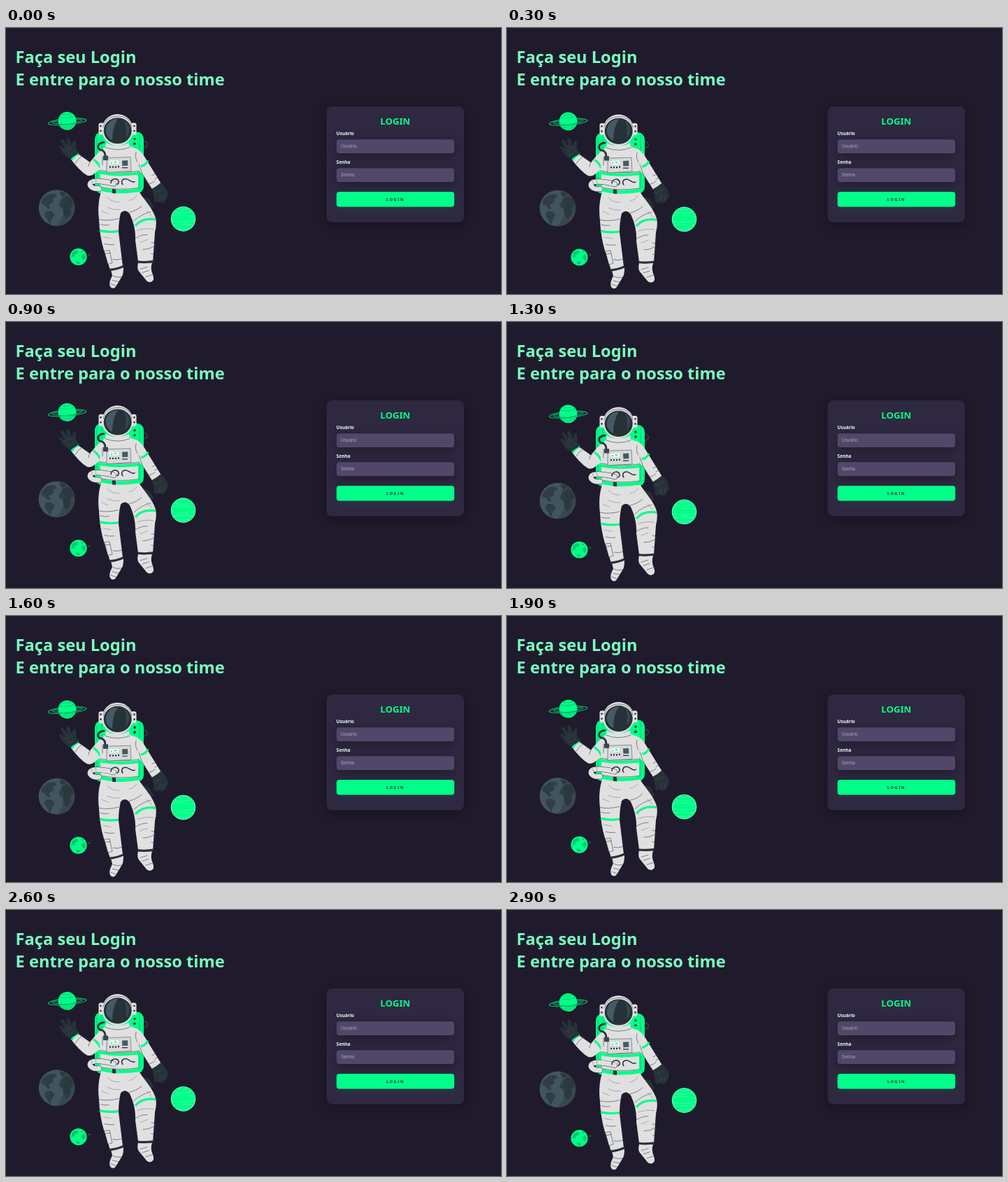
Write an HTML page that moves like this. It is 708 by 380 pixels and loops after 3000 ms.

```html
<!DOCTYPE html>
<html lang="pt">
<head>
<meta charset="utf-8">
<title>Login</title>
<style>
  html, body { margin: 0; width: 100%; height: 100%; overflow: hidden; background: #201b2c; }
  svg { display: block; width: 708px; height: 380px; }
  text { font: 700 23.63px "Noto Sans", sans-serif; }
  .title { fill: #77ffc0; }
  .label { font-size: 6.5px; fill: #f0ffff; }
  .hint { font: 6.7px "Liberation Sans", Arial, sans-serif; fill: #aaa3b8; }
  .shadow { filter: drop-shadow(0 4px 8px #00000056); }
  .suit { fill: #e0e0e0; }
  .green { fill: #00ff88; }
  .leaf { fill: #08b665; }
  .dark { fill: #263238; }
  .slate { fill: #455a64; }
  .line { fill: none; stroke: #263238; stroke-width: .55; stroke-linecap: round; stroke-linejoin: round; }
  .fold { fill: none; stroke: #8c9194; stroke-width: .7; stroke-linecap: round; }
  .band { fill: none; stroke: #00ff88; stroke-width: 3.2; }
  .strap { fill: none; stroke: #263238; stroke-width: 3.2; }
  .hose { fill: none; stroke: #263238; stroke-width: 2.5; stroke-linecap: round; }
  .stripe { fill: none; stroke: #08b665; stroke-width: .7; }
</style>
</head>
<body>
<svg viewBox="0 0 708 380">
  <g class="title">
    <text x="13.6" y="50.1">Faça seu Login</text>
    <text x="13.6" y="82.4">E entre para o nosso time</text>
  </g>

  <rect class="shadow" x="458.5" y="112" width="196.5" height="165.5" rx="8" fill="#2f2841"/>
  <text class="green" x="556.8" y="138.4" text-anchor="middle" style="font-size:13.2px">LOGIN</text>
  <text class="label" x="472.6" y="153.2">Usuário</text>
  <rect class="shadow" x="472.8" y="159.3" width="168.2" height="19.8" rx="4" fill="#514869"/>
  <text class="hint" x="478.7" y="171.3">Usuário</text>
  <text class="label" x="472.6" y="194.2">Senha</text>
  <rect class="shadow" x="472.8" y="200.2" width="168.2" height="19.8" rx="4" fill="#514869"/>
  <text class="hint" x="478.7" y="212.3">Senha</text>
  <rect class="green" x="472.7" y="234" width="168.5" height="21.4" rx="4" style="filter:drop-shadow(0 4px 8px #00ff8010)"/>
  <text x="544" y="246.8" fill="#2b124b" style="font-size:5.3px;letter-spacing:1.75px">LOGIN</text>

  <g id="space">
    <!-- ringed planet -->
    <g transform="translate(87.5 133.3) rotate(-5)">
      <circle class="green" r="13"/>
      <path class="stripe" d="M-11-6Q0-3 11-6M-8-10Q0-8 8-10M-12 7Q0 10 12 6M-9 10Q0 12 9 9"/>
      <path class="leaf" d="M-12.7 2Q0 7 12.8 2L12.6 3.6Q0 9-12.4 3.6Z"/>
      <path d="M-12.5-3C-37 0-30 5 0 5S37 0 12.5-3" fill="none" stroke="#08b665" stroke-width="1.2"/>
      <path d="M-12.8-1C-29 0-22 3 0 3S29 0 12.8-1" fill="none" stroke="#00ff88" stroke-width=".7"/>
    </g>

    <!-- grey planet -->
    <circle cx="72.5" cy="257.5" r="25.8" fill="#42555f"/>
    <path d="M76 232A25.8 25.8 0 0 1 72 283.300Q91 264 76 232Z" fill="#37474f"/>
    <g class="dark" opacity=".65">
      <path d="M52 245l8-7 9-1 4 4-6 3 1 5-7 4 3 5-4 1-5-6-5-2Z"/>
      <path d="M57 262l8 0 5 5-4 6-3 8-4-7-4-6Z"/>
      <path d="M79 245l8-5 7 3 3 10-5 4 1 8-6 8-5-7-1-7-6-5Z"/>
      <path d="M76 235l7 0 3 3-6 3Z"/>
    </g>

    <!-- striped planet -->
    <circle class="green" cx="253.500" cy="273.3" r="17.7"/>
    <circle cx="253.500" cy="273.3" r="17.2" fill="none" stroke="#6affb9"/>
    <path d="M240 263Q253 267 267 262M237 268Q250 266 270 270M237 276Q252 280 270 275M239 282Q253 279 268 282M244 287Q254 289 263 286M246 259Q254 261 261 258" fill="none" stroke="#45f5a5"/>

    <!-- small planet -->
    <circle class="green" cx="103.5" cy="327.5" r="12.1"/>
    <g class="leaf" opacity=".75">
      <path d="M95 321l5-3 4 2-2 3-4 1 1 4-4-1-2 2Z"/>
      <path d="M107 326l5-3 2 4-2 5-3-2Z"/>
      <path d="M99 334l4-1 3 3-3 2Z"/>
      <circle cx="109" cy="319.5" r="1.2"/>
      <circle cx="119" cy="324.3" r="1"/>
    </g>

    <!-- backpack -->
    <path class="hose" style="stroke:#37474f;stroke-width:1.3" d="M194 163C205 160 205 173 195 171"/>
    <path class="dark" d="M197 242l8 3 6 11-7 7-8-12Z"/>
    <rect class="green" x="127" y="149" width="70" height="88" rx="10"/>
    <path class="stripe" d="M130 157v66M137 152v20M191 153v76"/>
    <g class="dark"><circle cx="184" cy="159" r="1.800"/><circle cx="184" cy="166" r="1.800"/></g>

    <!-- raised arm -->
    <path class="suit" d="M140 173C132 177 126 185 120 192L103 180 93 188C100 198 109 207 116 211Q122 213 128 207L144 196Z"/>
    <path class="band" d="M125 188Q132 193 135 200M94 189Q97 182 104 180"/>
    <path class="line" d="M103 180l17 12 6-8M99 194Q102 188 108 184M120 192q-2 3-2 6"/>
    <path class="dark" d="M92 187C86 185 82 180 80 177L76 171Q76 168 79 169L84 173 78 161Q79 158 82 160L88 169 86 159Q88 156 91 159L94 169 96 162Q99 160 100 163L100 173Q104 176 103 180Z"/>
    <path class="line" style="stroke:#455a64" d="M84 173q2 3 5 3M88 169l2 4M94 169v4M88 181q6 0 10-6"/>

    <!-- lowered arm -->
    <path class="suit" d="M178 171C190 171 196 180 201 189L222 223 209 231 195 209 183 197Z"/>
    <path class="band" d="M193 198Q200 197 203 190"/>
    <path class="line" d="M190 195l5 14 14 22M209 211l6-3M213 216l4-2M205 223q5-1 8-4"/>
    <path class="dark" d="M209 230Q215 227 222 221L229 230Q233 236 231 242L226 249Q222 252 219 248L215 250Q211 249 212 244Z"/>
    <path class="line" style="stroke:#455a64" d="M219 248l2-8M225 247l1-7M212 235q7 0 12-5"/>

    <!-- legs -->
    <path class="suit" d="M137 232L189 232C194 242 209 256 214 272Q216 281 213 292L210 335 189 334 185 304Q186 285 177 266Q170 258 164 265Q161 277 161 292L167 341 149 346 140 318Q134 298 133 275Q130 250 137 232Z"/>
    <path class="suit" d="M150 346l18-4Q168 352 166 355L157 370Q154 374 150 371Q147 368 149 361L152 354Z"/>
    <path class="suit" d="M189 336l20 0Q206 344 210 353Q213 361 208 363Q203 365 199 359L190 348Q187 344 189 336Z"/>
    <path class="band" d="M134 290Q147 293 161 291M185 283Q195 271 214 274"/>
    <path class="strap" d="M148 346Q159 345 168 341M188 334.5Q199 336 211 334"/>
    <path class="line" d="M133 274Q144 277 161 273M135 281Q140 283 147 282M176 264Q186 262 194 255M183 276Q194 266 207 263M141 309Q148 311 155 310M185 301Q195 295 202 296M196 317Q204 317 211 313M153 331Q159 333 166 330"/>
    <path class="fold" d="M145 242Q151 250 162 249M176 247Q183 246 187 240M137 262L146 266M201 262L209 270M139 299L150 301M192 307L202 303M145 257Q154 261 162 260M188 290Q200 286 211 288"/>
    <path class="suit" d="M141 319l7-1 4 18-6 2Z"/>
    <path class="line" d="M141 319l7-1 4 18-6 2ZM142 323l7-1M208 307l5 1-1 16-4-1M153 355q7 3 12 1M152 361l9 2M150 366l8 3M192 345l10-3M195 350l9-3M200 356l9-3"/>

    <!-- torso -->
    <path class="suit" d="M142 170Q159 165 179 170Q188 174 189 187L189 236Q163 241 136 234L134 194Q134 175 142 170Z"/>
    <path class="band" style="stroke-width:4" d="M134 207Q159 212 190 208"/>
    <path class="band" style="stroke-width:5" d="M137 231Q160 237 190 232"/>
    <path class="dark" d="M152 230.5l5 .5v6l-5-.5Z"/>
    <path class="line" d="M136 228Q160 233 190 229M135 204Q160 209 189 205M186 178q-2 8 2 14M138 184v12"/>

    <!-- control panel -->
    <path d="M144 186l34-1 1 20-35 2Z" fill="#d8d8d8" stroke="#455a64" stroke-width=".6"/>
    <path d="M148 190l13-.5v5l-13 .5Z" fill="#f7f7f7"/>
    <path class="green" d="M150 192h2v2h-2zM155 191h3v2h-3z"/>
    <path class="slate" d="M166 190l8-.4.4 7.5-8 .4Z"/>
    <path class="dark" d="M148 198h2v2.300h-2zM152 198h2v2.300h-2zM156 198h2v2.300h-2zM160 197.5h2v2.300h-2zM166 199.5h8v1.200h-8z"/>

    <!-- hoses -->
    <path class="line" style="stroke-width:7.800" d="M154 223C142 220 132 218 124 220C116 223 121 231 133 230"/>
    <path class="line" style="stroke:#e0e0e0;stroke-width:6.900" d="M154 223C142 220 132 218 124 220C116 223 121 231 133 230"/>
    <path class="fold" d="M122 218l2 5M128 217l1 5"/>
    <path class="hose" style="stroke-width:1.5" d="M150 222C150 216 158 214 161 219Q162 222 159 224M167 224C164 221 166 216 171 216S180 223 184 220"/>
    <path class="hose" style="stroke-width:2.800" d="M140 164C129 165 130 175 137 175Q142 177 142 184"/>
    <rect x="139" y="183" width="7" height="6.5" fill="#37474f"/>

    <!-- helmet -->
    <path class="suit" d="M143 164Q159 174 176 164L177 171Q159 178 142 171Z"/>
    <path class="line" d="M142 171Q159 178 177 171"/>
    <rect class="suit" x="132.5" y="136" width="8" height="17" rx="3"/>
    <rect class="suit" x="178.5" y="136" width="8" height="17" rx="3"/>
    <g class="dark">
      <circle cx="135.5" cy="140.5" r="1.3"/><circle cx="135.5" cy="147.5" r="1.3"/>
      <circle cx="183.5" cy="140.5" r="1.3"/><circle cx="183.5" cy="147.5" r="1.3"/>
    </g>
    <ellipse class="suit" cx="159.5" cy="146" rx="22.3" ry="22.5"/>
    <path class="line" d="M139 142Q142 127 159.5 126.5T180 142"/>
    <ellipse class="dark" cx="159.7" cy="147.3" rx="20" ry="18.6"/>
    <path d="M146 137Q151 130 160 130Q152 142 152 161Q145 157 143 150Q142 143 146 137Z" fill="#455a64"/>
    <path d="M169 132Q177 138 176 148Q175 154 171 157Q174 144 169 132Z" fill="#37474f"/>
  </g>
</svg>
<script>
  const space = document.getElementById("space");
  const PERIOD = 1500, PHASE = 190, RISE = 5.4, REST = 0.8;

  // Linear rise and fall, twice per three-second loop
  function float(now) {
    const phase = ((now - PHASE) / PERIOD % 1 + 1) % 1;
    const lift = RISE * (1 - Math.abs(1 - 2 * phase));
    space.setAttribute("transform", `translate(0 ${(REST - lift).toFixed(3)})`);
    requestAnimationFrame(() => float(performance.now() - start));
  }
  const start = performance.now();
  float(0);
</script>
</body>
</html>
```
